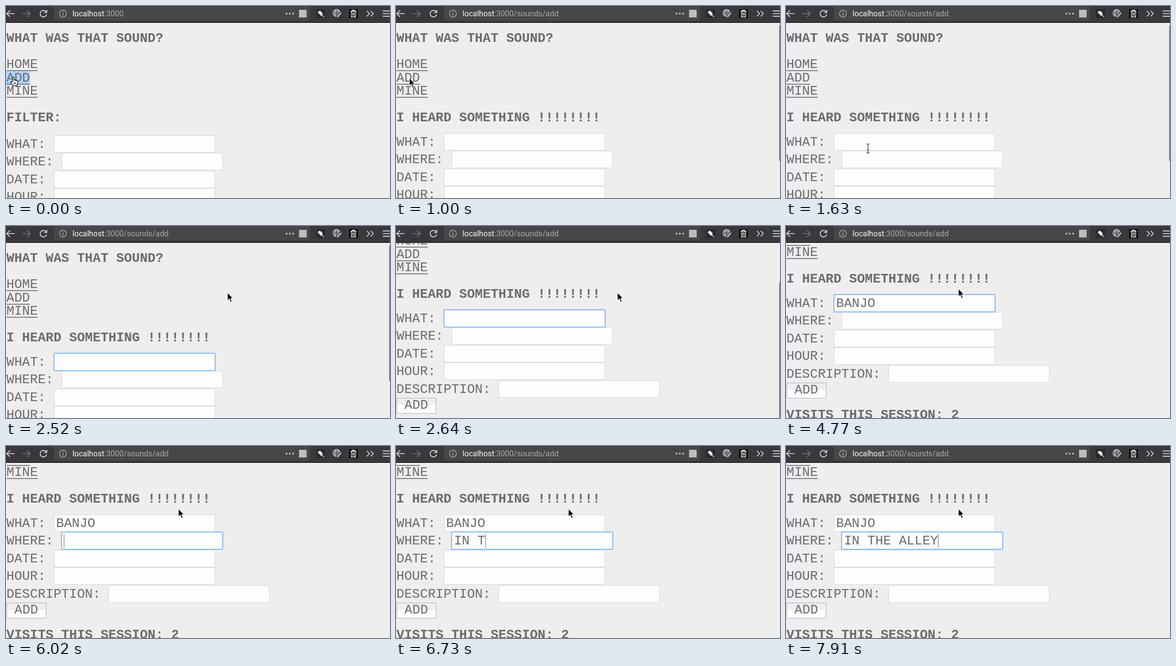
Write an HTML page that moves like this. It is 705 px wide and 353 px high and loops after 8 s.

```html
<!DOCTYPE html>
<html lang="en">
<head>
<meta charset="utf-8">
<title>What was that sound?</title>
<style>
  html, body { margin: 0; width: 100%; height: 100%; overflow: hidden; background: #eee; }
  svg { display: block; width: 705px; height: 353px; }
  .mono { font: 24px "Liberation Mono", "Courier New", monospace; fill: #6b6b6b; white-space: pre; }
  .b { font-weight: 700; }
  .url { font: 14.3px Roboto, sans-serif; fill: #a9a9ad; }
  .line { fill: none; stroke: #d4d4d6; stroke-width: 1.7; stroke-linecap: round; stroke-linejoin: round; }
</style>
</head>
<body>
<svg viewBox="0 0 705 353">
  <defs><clipPath id="view"><rect y="31" width="705" height="322"/></clipPath></defs>
  <rect width="705" height="353" fill="#eee"/>

  <g clip-path="url(#view)">
    <g id="page">
      <rect id="mark" y="120" width="44" height="25" fill="#b0d3fb"/>
      <g id="nav"></g>
      <g id="home"></g>
      <g id="add"></g>
      <rect id="ring" width="296" height="32" rx="1.5" fill="none" stroke="#90bdf0" stroke-width="2"/>
      <g id="typed"></g>
      <rect id="caret" width="1" height="25" fill="#777"/>
    </g>
    <rect id="bar" x="703.6" width="6" height="251" rx="3" fill="#666"/>
  </g>

  <rect width="705" height="31" fill="#38383d"/>
  <rect y="30" width="705" height="1" fill="#0e0e10"/>
  <rect x="88" y="-4" width="470" height="31" rx="3" fill="#474749"/>
  <g class="line">
    <path d="M15 14H1.5M7 8.3L1.3 14L7 19.7"/>
    <path d="M31 14H44.5M39 8.3L44.7 14L39 19.7" stroke="#737378"/>
    <path d="M73.6 10.6A6 6 0 1 0 74.4 16M74.8 7.8V12H70.4"/>
    <circle cx="104.5" cy="14" r="6.3" stroke="#b1b1b3" stroke-width="1.2"/>
    <path d="M104.5 13.4V17M104.5 10.9V11" stroke="#b1b1b3" stroke-width="1.5"/>
    <path d="M663 9.5L667.5 14L663 18.5M670 9.5L674.5 14L670 18.5"/>
    <path d="M692.5 9.2H704M692.5 14H704M692.5 18.8H704"/>
  </g>
  <g fill="#bdbdc0">
    <circle cx="515" cy="14" r="1.8"/><circle cx="521" cy="14" r="1.8"/><circle cx="527" cy="14" r="1.8"/>
    <rect x="538" y="7" width="14" height="14"/>
  </g>
  <rect x="570" y="6" width="16" height="16" fill="#29292d"/>
  <path d="M573 11.5L575.5 9.4L577.6 10.2L580.4 13L580.6 15.6L578.6 17.6L576.4 15.2ZM578.6 15L584 20.3" fill="#f4f4f4" stroke="#f4f4f4" stroke-width="1.2"/>
  <g class="line" stroke-width="1.1" style="stroke-width:1.1">
    <circle cx="607" cy="13" r="6.6"/>
    <ellipse cx="607" cy="13" rx="3" ry="6.6"/>
    <path d="M600.5 13H613.5M601.6 9.6H612.4M601.6 16.4H612.4"/>
    <path d="M608 20.5L615 12.8" stroke="#38383d" style="stroke-width:4.5"/>
    <path d="M608.6 20L614.8 13.2" style="stroke-width:2"/>
  </g>
  <rect x="630" y="6" width="16" height="16" fill="#050505"/>
  <path d="M632.5 9.5H643.5M636 9V7.6H640V9M634 10V20H642V10M636.7 11.5V18M639.3 11.5V18" fill="none" stroke="#fff" stroke-width="1.3"/>
  <text class="url" x="122" y="19"><tspan fill="#f9f9fa">localhost</tspan>:3000<tspan id="path"></tspan></text>

  <g id="cursor" stroke-linejoin="round">
    <path id="hand" d="M-1.5 9V1.6C-1.5 -.6 1.3 -.6 1.3 1.6V6C1.6 5 3.6 5.2 3.8 6.4C4.2 5.6 5.8 5.8 6 7C6.6 6.4 7.8 6.8 7.8 8V11.5L6.3 16H-.6L-4.6 10.6C-5.4 9 -3.6 7.8 -2.5 8.8ZM1.4 10V13.6M3.8 10V13.6" fill="#fff" stroke="#000" stroke-width="1.1"/>
    <path id="arrow" d="M0 0V14.4L3.3 11.3L5.9 17.2L8.3 16.2L5.8 10.5H10.2Z" fill="#000" stroke="#fff" stroke-width="1"/>
    <path id="beam" d="M-3 -8.5Q0 -8.5 0 -6.5Q0 -8.5 3 -8.5M0 -6.5V6.5M-3 8.5Q0 8.5 0 6.5Q0 8.5 3 8.5M-1.5 2.5H1.5" fill="none" stroke="#333" stroke-width="1.1"/>
  </g>
</svg>
<script>
const $ = id => document.getElementById(id);
const LOOP = 8000, CH = 14.4;

const text = (s, x, y, cls = "") => `<text class="mono ${cls}" x="${x}" y="${y}">${s}</text>`;
const bold = (s, y) => text(s, 0.8, y, "b");

const rows = [
  { name: "WHAT", x: 88, y: 234 },
  { name: "WHERE", x: 102, y: 266 },
  { name: "DATE", x: 88, y: 299 },
  { name: "HOUR", x: 88, y: 331 },
  { name: "DESCRIPTION", x: 188, y: 364 }
];
const field = r => text(r.name + ":", 0.8, r.y + 23) +
  `<rect x="${r.x + .5}" y="${r.y + .5}" width="295" height="31" fill="#fdfdfd" stroke="#d9d9d9"/>`;

$("nav").innerHTML = bold("WHAT WAS THAT SOUND?", 66) +
  ["HOME", "ADD", "MINE"].map((s, i) => {
    const y = 114 + Math.round(i * 24.5);
    return text(s, 0.8, y) +
      `<rect x="0.8" y="${y + 4}" width="${s.length * CH}" height="1.5" fill="#6b6b6b"/>`;
  }).join("");
$("home").innerHTML = bold("FILTER:", 212) +
  `<g transform="translate(0 4)">${rows.slice(0, 4).map(field).join("")}</g>`;
$("add").innerHTML = bold("I HEARD SOMETHING !!!!!!!!", 212) + rows.map(field).join("") +
  `<rect x="1.5" y="396.5" width="72" height="28" fill="#fff" stroke="#b4b4b4"/>
   <rect x="2" y="397" width="71" height="12" fill="#efefef"/>` +
  text("ADD", 15.6, 416) + bold("VISITS THIS SESSION: 2", 462);

// One entry per typed field: row, text start, key times
const inputs = [
  { row: rows[0], x: 92, word: "BANJO", keys: [4000, 4120, 4230, 4350, 4590] },
  { row: rows[1], x: 106.4, word: "IN THE ALLEY",
    keys: [6500, 6580, 6650, 6730, 6820, 6910, 7010, 7110, 7200, 7320, 7850, 7910] }
];
$("typed").innerHTML = inputs.map(f => text("", f.x, f.row.y + 23)).join("");
const words = [...$("typed").children];

// Caret toggles, starting from off
const blinks = [1930, 2520, 3060, 3650, 4000, 4770, 4890, 5430, 6020, 7670, 7850];

const clamp = v => Math.max(0, Math.min(1, v));
const smooth = v => v * v * (3 - 2 * v);
// n equal jumps, the first at a and the last at b
const steps = (t, a, b, n) => clamp((Math.floor((t - a) / (b - a) * (n - 1) + 1e-6) + 1) / n);
const mix = (p, q, k) => [p[0] + (q[0] - p[0]) * k, p[1] + (q[1] - p[1]) * k];

const spots = { link: [13.5, 130.5], add: [24.5, 132.5], input: [150.5, 262],
  side: [406.5, 122.5], turn: [323.5, 124.5], rest: [316.5, 115.5] };

function pointer(t) {
  if (t < 1000) return mix(spots.link, spots.add, steps(t, 60, 230, 4));
  if (t < 2230) return mix(spots.add, spots.input, smooth(steps(t, 1063, 1630, 10)));
  if (t < 3240) return mix(spots.input, spots.side, smooth(steps(t, 2230, 2340, 3)));
  const k = steps(t, 3240, 3470, 5);
  return k <= 0.6 ? mix(spots.side, spots.turn, k / 0.6) : mix(spots.turn, spots.rest, (k - 0.6) / 0.4);
}

const show = (id, on) => $(id).setAttribute("visibility", on ? "visible" : "hidden");
const place = (id, x, y) => { $(id).setAttribute("x", x); $(id).setAttribute("y", y); };

function draw(t) {
  const loaded = t >= 585;
  const scroll = Math.round(108 * smooth(steps(t, 2580, 2700, 3)));
  $("path").textContent = t >= 530 ? "/sounds/add" : "";
  show("mark", !loaded);
  show("home", !loaded);
  show("add", loaded);
  $("page").setAttribute("transform", `translate(0 ${-scroll})`);

  $("bar").setAttribute("y", 35 + scroll * 91 / 108);
  $("bar").setAttribute("opacity", t < 640 ? 0 : 1 - steps(t, 4000, 4350, 6));

  const counts = inputs.map(f => f.keys.filter(k => t >= k).length);
  inputs.forEach((f, i) => words[i].textContent = f.word.slice(0, counts[i]));

  const cur = t < 4890 ? 0 : 1, { row, x } = inputs[cur];
  show("ring", t >= 1930);
  place("ring", row.x, row.y);
  show("caret", blinks.filter(b => t >= b).length % 2);
  place("caret", Math.floor(x + counts[cur] * CH), row.y + 4);

  const [px, py] = pointer(t);
  const overInput = t < 3000 && px > 88 && px < 384 && py > 234 && py < 266;
  $("cursor").setAttribute("transform", `translate(${px} ${py})`);
  show("hand", t < 1000);
  show("arrow", t >= 1000 && !overInput);
  show("beam", t >= 1000 && overInput);
}

function tick() {
  draw(performance.now() % LOOP);
  requestAnimationFrame(tick);
}
tick();
</script>
</body>
</html>
```
